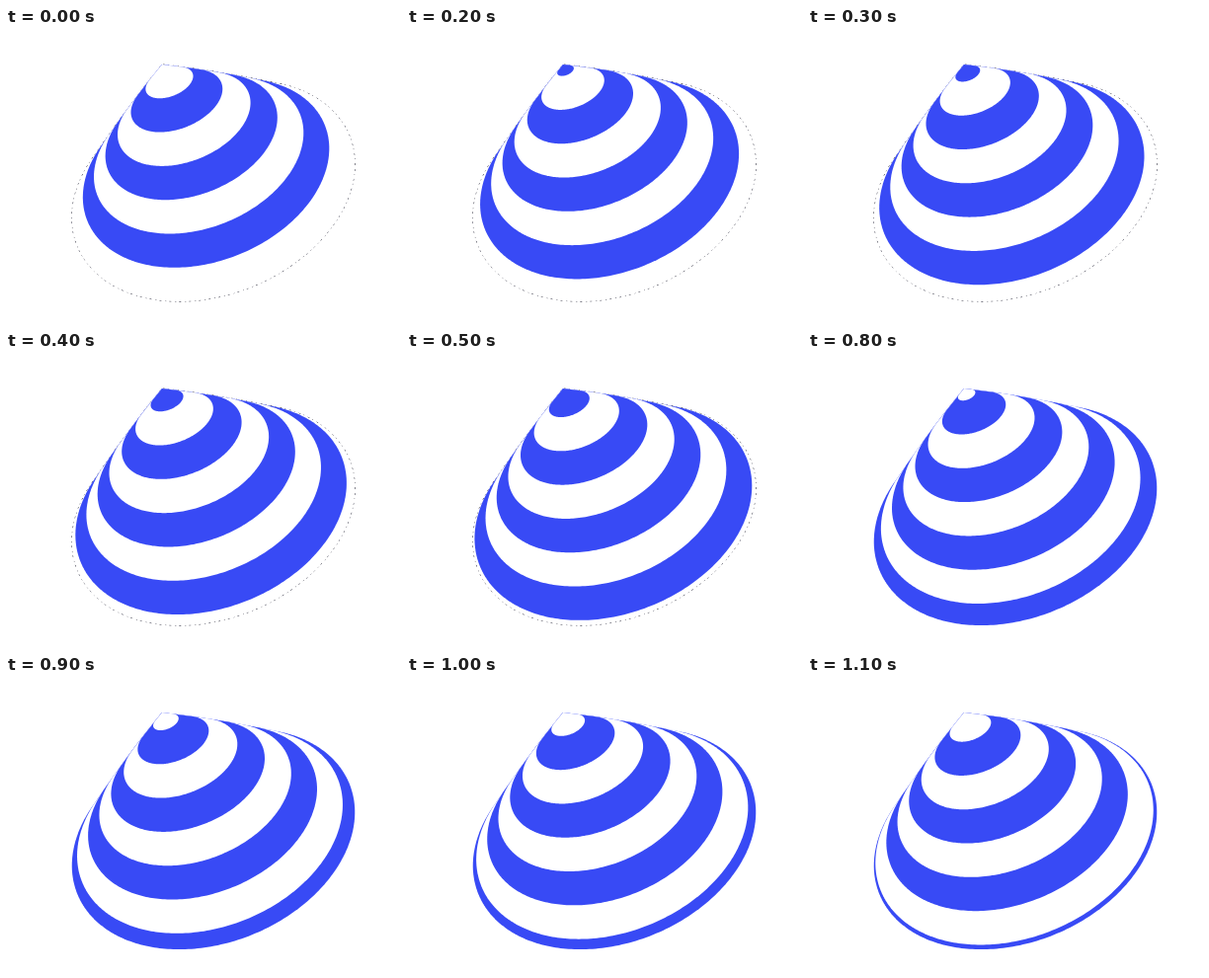
Animation, 400 px wide and 300 px high, one loop 1.2 s. Source, as an HTML page with a canvas:

```html
<!DOCTYPE html>
<html lang="en">
<head>
<meta charset="utf-8">
<title>Striped cone</title>
<style>
html, body { margin: 0; width: 100%; height: 100%; overflow: hidden; background: #fff; }
canvas { display: block; width: 400px; height: 300px; }
</style>
</head>
<body>
<canvas id="stage" width="400" height="300"></canvas>
<script>
const ctx = document.getElementById('stage').getContext('2d');
const LOOP = 1200, STEP = 100;
const CYCLE = 1180; // time in which the stripes travel two bands
const BANDS = 7, BLUE = '#384af5', WHITE = '#fff', EDGE = '#223';
const APEX = { x: 158, y: 37 };

// Cross-section of the cone at distance k from the apex,
// as a centre and the terms of a tilted ellipse.
function ring(k) {
  const a = k * (25.05 - 1.04 * k + 0.055 * k * k);
  const c = 16 * k;
  return {
    x: APEX.x + 7.43 * k,
    y: APEX.y + 18.3 * k,
    xx: a * a,
    yy: c * c,
    xy: -0.486 * (a * a - c * c)
  };
}

// Outer contour of all rings from the apex up to k: for every
// direction, take the ring that reaches furthest.
function contour(k) {
  const path = new Path2D(), rings = [], count = 60, turns = 360;
  for (let i = 1; i <= count; i++) rings.push(ring(k * i / count));
  for (let i = 0; i < turns; i++) {
    const angle = i / turns * 2 * Math.PI;
    const nx = Math.cos(angle), ny = Math.sin(angle);
    let far = APEX.x * nx + APEX.y * ny, px = APEX.x, py = APEX.y;
    for (const r of rings) {
      const dx = r.xx * nx + r.xy * ny;
      const dy = r.xy * nx + r.yy * ny;
      const h = Math.sqrt(dx * nx + dy * ny);
      const reach = r.x * nx + r.y * ny + h;
      if (reach > far) {
        far = reach;
        px = r.x + dx / h;
        py = r.y + dy / h;
      }
    }
    path.lineTo(px, py);
  }
  path.closePath();
  return path;
}

const outline = contour(BANDS);

function fill(path, band) {
  ctx.fillStyle = band % 2 ? BLUE : WHITE;
  ctx.fill(path);
}

// Fine broken line, half covered by the bands
function strokeRim() {
  ctx.strokeStyle = EDGE;
  ctx.lineWidth = 1;
  ctx.setLineDash([1, 4, 2, 3]);
  ctx.stroke(outline);
}

function draw(shift) {
  ctx.fillStyle = WHITE;
  ctx.fillRect(0, 0, 400, 300);

  let band = Math.ceil(BANDS - shift) - 1;
  if (band % 2 === 0) strokeRim();
  fill(outline, band);
  for (; band + shift > 0.001; band--) fill(contour(band + shift), band - 1);
}

const start = performance.now();
let last = -1;

function tick(now) {
  const time = Math.max(0, now - start) % LOOP;
  const step = Math.floor(time / STEP);
  if (step !== last) {
    last = step;
    draw(2 * step * STEP / CYCLE);
  }
  requestAnimationFrame(tick);
}
tick(start);
</script>
</body>
</html>
```
